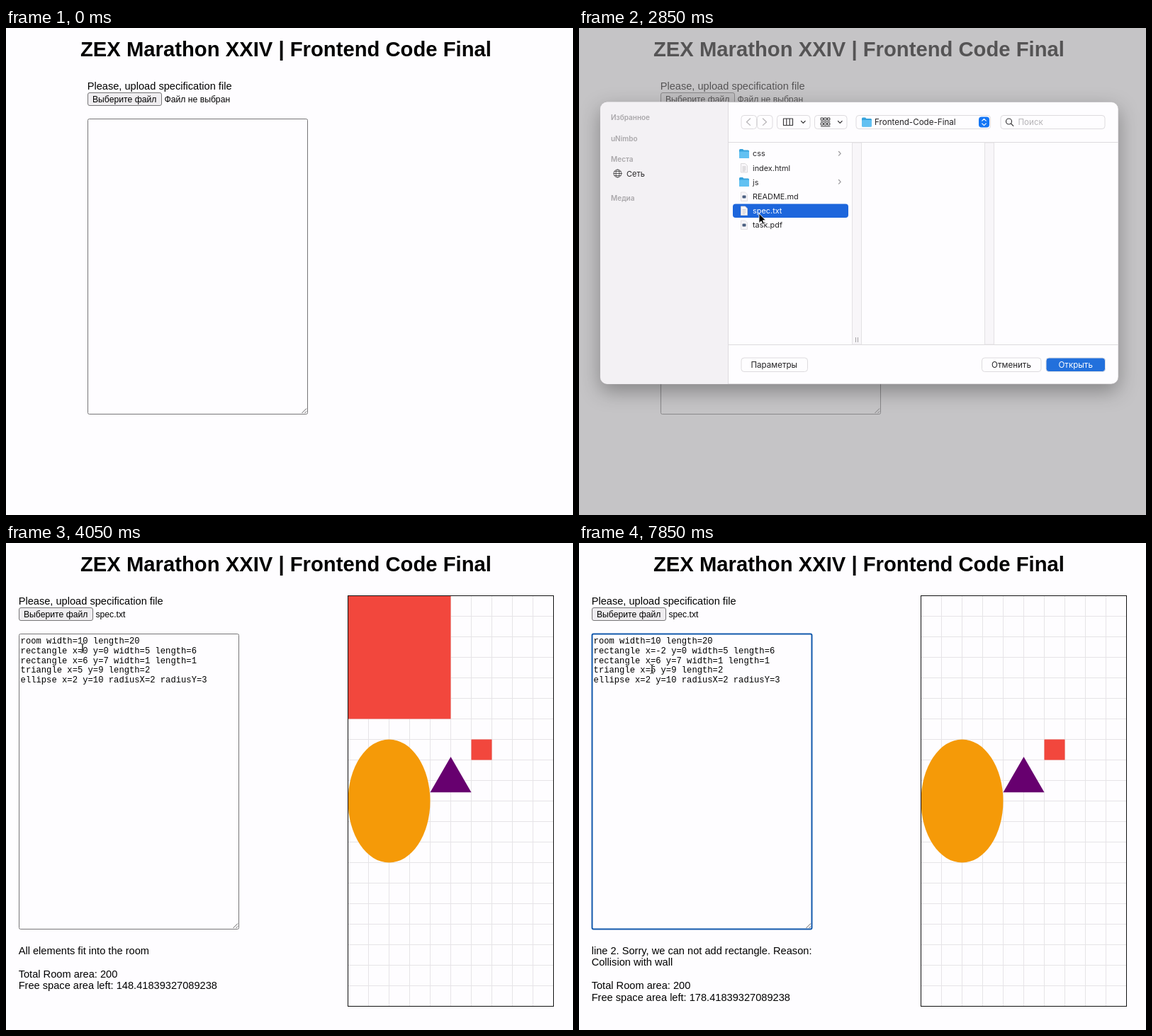
These frames come from a looping animation (800x688 px, 8 s). An HTML page:

```html
<!DOCTYPE html>
<html lang="ru">
<head>
<meta charset="utf-8">
<title>Room planner</title>
<style>
  html, body { margin: 0; height: 100%; overflow: hidden; background: #fefdff; }
  svg { display: block; width: 800px; height: 688px; font: 14.62px "Liberation Sans", Arial, sans-serif; }
  h1, .title { font-weight: bold; font-size: 29.24px; }
  .small { font-size: 12.18px; }
  .code { font: 12.18px "Liberation Mono", monospace; }
  .ui { font: 11.6px Inter, sans-serif; fill: #242325; }
  .files { font-size: 10.9px; }
  .heads { font-size: 10px; font-weight: 600; fill: #a9a7aa; }
  .mid { text-anchor: middle; }
  .box { fill: #fefdff; stroke: #dddbde; }
  .rule { fill: none; stroke: #dddbde; }
  .icon { fill: none; stroke: #3b3a3c; stroke-width: 1.2; stroke-linecap: round; stroke-linejoin: round; }
  .soft { stroke: #b5b3b6; }
  #body { filter: drop-shadow(0 10px 14px rgba(0, 0, 0, .32)); }
</style>
</head>
<body>
<svg viewBox="0 0 800 688">
  <defs>
    <pattern id="grid" x="482" y="74" width="29" height="29" patternUnits="userSpaceOnUse">
      <path d="M.5 0V29M0 .5H29" stroke="#e6e4e7"/>
    </pattern>
    <clipPath id="frame"><rect x="30" y="104.5" width="731" height="398.5" rx="10"/></clipPath>
    <g id="folder">
      <path d="M0 1.5q0-1.5 1.5-1.5h3.5l1.5 1.5h6q1.5 0 1.5 1.5v8.500q0 1.500-1.500 1.500h-11q-1.500 0-1.500-1.500z" fill="#36a3dc"/>
      <rect y="3.500" width="14" height="9.500" rx="1.300" fill="#62c1f2"/>
    </g>
    <g id="page">
      <path d="M.5 .5h6l3 3v9.500h-9z" fill="#f8f6f9" stroke="#d3d1d4" stroke-width=".8"/>
      <path d="M2.500 5h5M2.500 7h5M2.500 9h5M2.500 11h4" stroke="#b4b2b5" stroke-width=".7"/>
    </g>
    <g id="sheet">
      <path d="M.5 .5h6l3 3v9.500h-9z" fill="#f8f6f9" stroke="#dddbde" stroke-width=".8"/>
      <rect x="2.500" y="5" width="5" height="4" rx="1" fill="#4a5f80"/>
    </g>
  </defs>

  <rect width="800" height="688" fill="#fefdff"/>
  <text class="title" x="105" y="39.500">ZEX Marathon XXIV | Frontend Code Final</text>

  <g id="form">
    <text x="17.700" y="87">Please, upload specification file</text>
    <rect x="18.500" y="91.500" width="104" height="18" rx="2.500" fill="#efedf0" stroke="#767577"/>
    <text class="small" x="25" y="104.700">Выберите файл</text>
    <text class="small" id="fileName" x="126.500" y="104.700"></text>
    <rect id="area" x="18.500" y="128.500" width="310" height="417" rx="2" fill="#fefdff"/>
    <path d="M320.500 544l6.500-6.500M324.500 544l2.500-2.500" stroke="#5f5e60"/>
    <rect id="selection" x="108.300" y="146" width="7.300" height="13.500" fill="#b3d7ff"/>
    <g class="code" id="code"></g>
    <path id="caret" d="M0 146v13" stroke="#000"/>
    <g id="report"></g>
  </g>

  <g id="room">
    <rect x="482.500" y="74.500" width="290" height="580" fill="url(#grid)"/>
    <g fill="#f2473d">
      <rect id="bigRect" x="482.500" y="74.500" width="145" height="174"/>
      <rect x="656.500" y="277.500" width="29" height="29"/>
    </g>
    <ellipse cx="540.500" cy="364.500" rx="58" ry="87" fill="#f59a08"/>
    <path d="M598.500 352.200h58l-29-50.200z" fill="#67006f"/>
    <rect x="482.500" y="74.500" width="290" height="580" fill="none" stroke="#111"/>
  </g>

  <rect id="shade" width="800" height="688" fill="#999799"/>

  <g id="dialog" class="ui">
    <rect id="body" x="30" y="104.500" width="731" height="398.500" rx="10" stroke="#b5b3b6" stroke-width=".6"/>
    <g id="browser">
      <rect x="30" y="104" width="180" height="400" fill="#f3f1f4" clip-path="url(#frame)"/>
      <path class="rule" d="M210.500 105V503M211 161.500H761M211 447.500H761"/>
      <g fill="#f8f6f9" stroke="#e3e1e4">
        <rect x="385.500" y="162" width="13" height="285"/>
        <rect x="572.500" y="162" width="13" height="285"/>
      </g>
      <path d="M390.500 437v7M393.500 437v7" stroke="#a3a1a4"/>
      <g class="heads">
        <text x="45" y="130">Избранное</text>
        <text x="45" y="159.500">uNimbo</text>
        <text x="45" y="188.700">Места</text>
        <text x="45" y="243.700">Медиа</text>
      </g>
      <g class="icon" style="stroke-width:.8">
        <circle cx="54.500" cy="205.500" r="5.500"/>
        <ellipse cx="54.500" cy="205.500" rx="2.500" ry="5.500"/>
        <path d="M49 205.500h11M50 202.500h9M50 208.500h9"/>
      </g>
      <text x="67" y="209.700" style="font-size:11px">Сеть</text>
      <rect id="picked" x="217" y="248.500" width="163" height="19.500" rx="4" fill="#1d66dc"/>
      <use href="#folder" x="226" y="171"/>
      <use href="#page" x="228" y="191"/>
      <use href="#folder" x="226" y="211"/>
      <use href="#sheet" x="228" y="231.500"/>
      <use href="#page" x="228" y="251.500"/>
      <use href="#sheet" x="228" y="271.500"/>
      <path class="icon" style="stroke:#98969a" d="M366.500 174.500l2.700 2.800-2.700 2.800M366.500 214.500l2.700 2.800-2.700 2.800"/>
      <g class="files">
        <text x="245" y="181.300">css</text>
        <text x="245" y="201.500">index.html</text>
        <text x="245" y="221.500">js</text>
        <text x="245" y="241.800">README.md</text>
        <text id="spec" x="245" y="262">spec.txt</text>
        <text x="245" y="282.200">task.pdf</text>
      </g>
    </g>
    <path id="strips" d="M211 104.500H748V161H211zM211 448H521V503H211z" fill="#fcfafd"/>

    <g class="box">
      <rect x="229" y="123.500" width="21.500" height="19" rx="4"/>
      <rect x="251.500" y="123.500" width="21.500" height="19" rx="4"/>
      <rect x="279.500" y="123.500" width="46.500" height="19" rx="4"/>
      <rect x="332.500" y="123.500" width="45.500" height="19" rx="4"/>
      <rect x="229" y="466" width="93.500" height="19.500" rx="4"/>
    </g>
    <path class="icon soft" d="M241.500 128l-5 4.700 5 4.700M259.500 128l5 4.700-5 4.700"/>
    <path class="icon" d="M288.500 128h13v9.500h-13zM292.800 128v9.500M297.200 128v9.500M313.500 131.500l2.800 2.800 2.800-2.800M365.500 131.500l2.800 2.800 2.800-2.800"/>
    <path class="icon" style="stroke-width:1" d="M341.500 127h3v3h-3zM346.200 127h3v3h-3zM350.900 127h3v3h-3zM341.500 134h3v3h-3zM346.200 134h3v3h-3zM350.900 134h3v3h-3zM341.500 132h12.500M341.500 139h12.500"/>
    <text class="mid" x="275.300" y="479.500">Параметры</text>

    <g id="place">
      <rect class="box" x="391" y="123.500" width="189.500" height="19" rx="4"/>
      <use href="#folder" x="399" y="126.500"/>
      <text x="417" y="136.700">Frontend-Code-Final</text>
      <rect id="stepper" x="564" y="125.500" width="15" height="15" rx="4" fill="#1476f5"/>
      <path id="arrows" class="icon" d="M568.700 131.200l2.800-2.800 2.800 2.800M568.700 134.800l2.800 2.800 2.800-2.800"/>
    </g>
    <g id="search">
      <rect class="box" x="595" y="123.500" width="147" height="19" rx="4"/>
      <circle class="icon" cx="606.500" cy="132" r="4"/>
      <path class="icon" d="M609.500 135l3.300 3.300"/>
      <text x="619.500" y="136.800" fill="#b5b3b6" style="fill:#b5b3b6">Поиск</text>
    </g>
    <g id="actions">
      <rect class="box" x="568.500" y="466" width="83.500" height="19.500" rx="4"/>
      <text class="mid" x="610" y="479.500">Отменить</text>
      <rect id="openBox" x="659" y="466" width="83.500" height="19.500" rx="4" stroke="#e3e1e4"/>
      <text id="openText" class="mid" x="700.700" y="479.500">Открыть</text>
    </g>
  </g>

  <path id="arrow" d="M0 0V13.500L3.100 10.700L5.200 15.300L7.500 14.300L5.400 9.800H9.500Z" fill="#000" stroke="#fff" stroke-width=".9"/>
  <g id="beam" fill="none">
    <path d="M-2.500-6.500q2.500 0 2.500 2v9q0 2-2.500 2M2.500-6.500q-2.500 0-2.500 2v9q0 2 2.500 2" stroke="#fff" stroke-width="2.600"/>
    <path d="M-2.500-6.500q2.500 0 2.500 2v9q0 2-2.500 2M2.500-6.500q-2.500 0-2.500 2v9q0 2 2.500 2M-1.500 2.500h3" stroke="#222"/>
  </g>
</svg>

<script>
const LOOP = 8000, STEP = 50;
const OPENED = 1800, PICKED = 2850, CLOSING = 3012, LOADED = 3250;
const FOCUSED = 4100, MINUS = 6200, TWO = 6350;

// pointer stops: time, x, y
const stops = [
  [350, 62, 250], [800, 142, 109], [2250, 142, 109], [2800, 254, 262],
  [3300, 254, 262], [3950, 108, 148], [4100, 108, 149], [4250, 116, 150],
  [4350, 116, 150], [4800, 604, 160], [5150, 560, 215], [5550, 672, 180],
  [5650, 672, 180], [6000, 150, 215], [7050, 150, 215], [7750, 103, 178], [8000, 103, 178]
];

const el = {};
document.querySelectorAll('[id]').forEach(node => el[node.id] = node);
const show = (node, on) => node.style.display = on ? '' : 'none';
const move = (node, x, y) => node.setAttribute('transform', `translate(${x} ${y})`);
const clamp = v => Math.max(0, Math.min(1, v));

function setLines(group, lines, x, y, pitch) {
  const markup = lines.map((s, i) => `<text x="${x}" y="${y + i * pitch}">${s}</text>`).join('');
  if (group.dataset.markup !== markup) group.innerHTML = group.dataset.markup = markup;
}

function pointerAt(t) {
  const i = Math.max(1, stops.findIndex(s => s[0] > t));
  const [t0, x0, y0] = stops[i - 1], [t1, x1, y1] = stops[i];
  const k = clamp((t - t0) / (t1 - t0)), ease = k * k * (3 - 2 * k);
  return [x0 + (x1 - x0) * ease, y0 + (y1 - y0) * ease];
}

function drawPage(t) {
  const loaded = t >= LOADED, focused = t >= FOCUSED, moved = t >= TWO;
  const x = moved ? '-2' : t >= MINUS ? '-' : '0';
  move(el.form, loaded ? 0 : 97, 0);
  el.fileName.textContent = loaded ? 'spec.txt' : 'Файл не выбран';
  el.area.setAttribute('stroke', focused ? '#1259ac' : '#767577');
  el.area.setAttribute('stroke-width', focused ? 2 : 1);
  setLines(el.code, loaded ? [
    'room width=10 length=20',
    `rectangle x=${x} y=0 width=5 length=6`,
    'rectangle x=6 y=7 width=1 length=1',
    'triangle x=5 y=9 length=2',
    'ellipse x=2 y=10 radiusX=2 radiusY=3'
  ] : [], 20.6, 142.2, 13.75);
  const verdict = moved
    ? ['line 2. Sorry, we can not add rectangle. Reason:', 'Collision with wall']
    : ['All elements fit into the room'];
  setLines(el.report, loaded ? [
    ...verdict, '', 'Total Room area: 200',
    `Free space area left: ${moved ? 178 : 148}.41839327089238`
  ] : [], 17.7, 581, 16.45);
  show(el.selection, t >= 4200 && t < MINUS);
  show(el.caret, t >= MINUS && (t < 6700 || t >= 7200 && t < 7700));
  move(el.caret, moved ? 123.5 : 115.5, 0);
  show(el.room, loaded);
  show(el.bigRect, !moved);
}

function drawDialog(t) {
  const fade = clamp((t - CLOSING) / 227), closing = fade > 0;
  const visible = t >= OPENED && fade < 1;
  const picked = t >= PICKED, blue = picked && t < 3100;
  show(el.shade, visible);
  show(el.dialog, visible);
  el.shade.style.opacity = .555 * (1 - fade);
  el.dialog.style.opacity = 1 - fade;
  move(el.dialog, 0, -46 * fade ** 1.63);
  el.body.style.fill = closing ? '#e9e7ea' : '#fefdff';
  show(el.browser, !closing);
  show(el.strips, closing);
  show(el.stepper, !closing);
  el.arrows.style.stroke = closing ? '#3b3a3c' : '#fff';
  move(el.place, closing ? -6.5 : 0, 0);
  move(el.search, closing ? -13 : 0, 0);
  move(el.actions, closing ? -239.5 : 0, 0);
  show(el.picked, picked);
  el.spec.style.fill = picked ? '#fff' : '';
  el.openBox.style.fill = blue ? '#2270dc' : '#fefdff';
  el.openText.style.fill = blue ? '#fff' : picked ? '' : '#b9b7ba';
}

function drawPointer(t) {
  const [x, y] = pointerAt(t);
  const visible = t >= 350 && t < MINUS || t >= 7050;
  const overText = t >= LOADED && x > 18 && x < 329 && y > 128 && y < 546;
  show(el.arrow, visible && !overText);
  show(el.beam, visible && overText);
  move(el.arrow, x, y);
  move(el.beam, x, y);
}

function draw() {
  const t = Math.floor(performance.now() % LOOP / STEP) * STEP;
  drawPage(t);
  drawDialog(t);
  drawPointer(t);
  requestAnimationFrame(draw);
}
draw();
</script>
</body>
</html>
```
